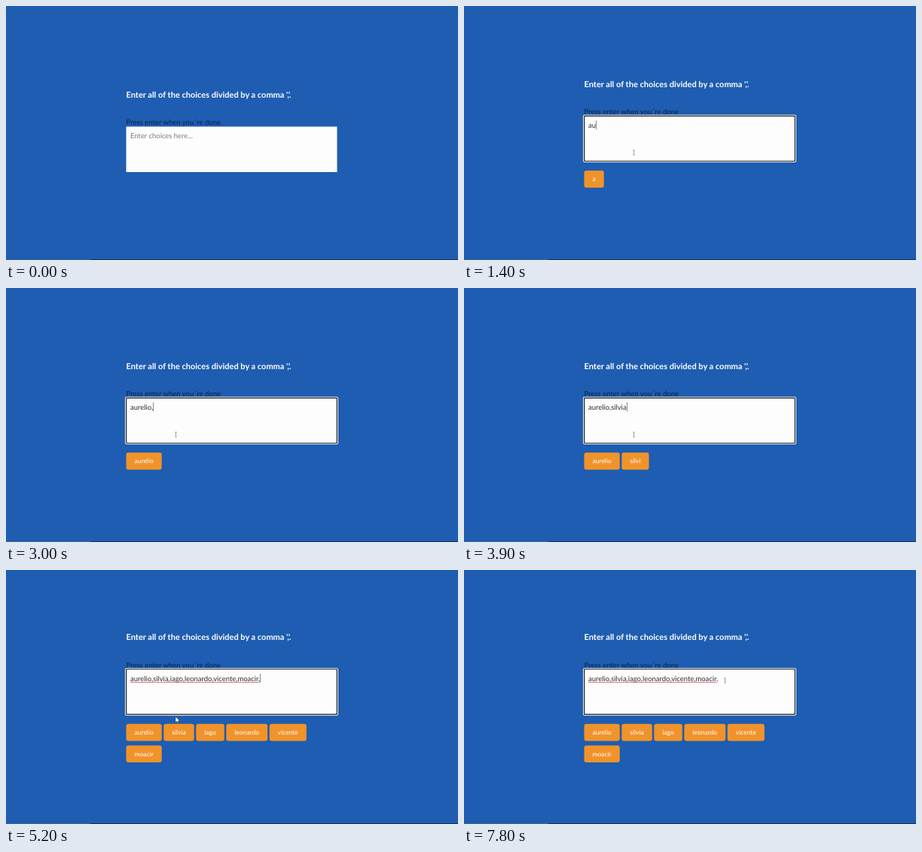
These frames come from a looping animation (600x338 px, 8 s). An HTML page with a canvas:

```html
<!DOCTYPE html>
<html lang="en">
<head>
<meta charset="utf-8">
<title>Choice picker</title>
<style>
html, body { margin: 0; width: 100%; height: 100%; overflow: hidden; background: #1e5db1; }
canvas { display: block; width: 600px; height: 338px; }
</style>
</head>
<body>
<canvas id="stage"></canvas>
<script>
const W = 600, H = 338, LOOP = 8000, TICK = 100;
const canvas = document.getElementById('stage');
const ctx = canvas.getContext('2d');
const ratio = window.devicePixelRatio || 1;
canvas.width = W * ratio;
canvas.height = H * ratio;
ctx.scale(ratio, ratio);
ctx.textRendering = 'geometricPrecision';

const FAMILY = 'Lato, "Open Sans", sans-serif';
const FONT = {
  title: `700 11px ${FAMILY}`,
  label: `400 9.55px ${FAMILY}`,
  input: `400 9.45px ${FAMILY}`,
  chip: `400 8.5px ${FAMILY}`
};
const COLOR = {
  page: '#1e5db1', label: '#0b2145', hint: '#7a7a7a', ink: '#2b2b2b',
  chip: '#f0932b', select: '#2f6fd2', spell: '#e2404a'
};

const FIRST = 'aurelio,', SECOND = 'silvia,';
const FULL = FIRST + SECOND + 'iago,leonardo,vicente,moacir,';
const ANCHOR = FULL.indexOf('leonardo');
const FOCUS = 600, PASTE = 5100, PRESS = 6400, CLICK = 7300;
const LEFT = 159.5, TEXT_X = 165, ROW = 28.6;

// Pointer path as [time, x, y]
const PATH = [
  [100, 138, 268], [300, 182, 232], [500, 225, 195],
  [6100, 225, 195], [6500, 243, 181], [6700, 285, 167],
  [7000, 341, 148], [7200, 346, 147]
];

function setFont(name) { ctx.font = FONT[name]; }

function measure(str, font) {
  setFont(font);
  return ctx.measureText(str).width;
}

function write(str, x, y, font, color) {
  setFont(font);
  ctx.fillStyle = color;
  ctx.fillText(str, x, y);
}

function box(x, y, w, h, r, color) {
  ctx.fillStyle = color;
  ctx.beginPath();
  ctx.roundRect(x, y, w, h, r);
  ctx.fill();
}

function typedAt(t) {
  const count = (start, word) =>
    Math.max(0, Math.min(word.length, Math.floor((t - start) / TICK) + 1));
  if (t >= PASTE) return FULL;
  return FIRST.slice(0, count(1300, FIRST)) + SECOND.slice(0, count(3400, SECOND));
}

function pointerAt(t) {
  if (t < PATH[0][0]) return null;
  const i = PATH.findIndex(p => p[0] > t);
  if (i < 0) return PATH[PATH.length - 1].slice(1);
  const [t0, x0, y0] = PATH[i - 1], [t1, x1, y1] = PATH[i];
  const k = (t - t0) / (t1 - t0);
  return [x0 + (x1 - x0) * k, y0 + (y1 - y0) * k];
}

function caretOn(t) {
  if (t < FOCUS) return false;
  let reset = FOCUS;
  if (t >= 1300) reset = Math.min(t, 2000);
  if (t >= 3400) reset = Math.min(t, 4000);
  if (t >= PASTE) reset = Math.min(t, 5200);
  if (t >= CLICK) reset = CLICK;
  return Math.floor((t - reset) / 500) % 2 === 0;
}

// Index reached by dragging from the anchor
function dragEnd(x) {
  let end = ANCHOR;
  while (end < FULL.length && TEXT_X + measure(FULL.slice(0, end + 1), 'input') <= x) end++;
  return end;
}

function layoutChips(text) {
  let x = LEFT, row = 0;
  return text.split(',').filter(Boolean).map(name => {
    const w = measure(name, 'chip') + 22;
    if (x + w > LEFT + 280) { x = LEFT; row++; }
    const chip = { name, x, w, row };
    x += w + 2.6;
    return chip;
  });
}

function drawField(y, focused) {
  if (focused) {
    box(158, y - 1.6, 283, 63.4, 2, '#fff');
    box(159, y - 0.6, 281, 61.4, 1.4, '#15171c');
    box(160.2, y + 0.6, 278.6, 59, 0.5, '#fdfdfe');
  } else {
    box(LEFT, y, 280, 60.4, 0, '#fdfdfe');
  }
  ctx.strokeStyle = '#b5b5b5';
  ctx.lineWidth = 0.5;
  ctx.beginPath();
  ctx.moveTo(435.5, y + 59);
  ctx.lineTo(438.3, y + 56.2);
  ctx.moveTo(437, y + 59);
  ctx.lineTo(438.3, y + 57.7);
  ctx.stroke();
}

function drawInput(t, text, y, pointer) {
  const base = y + 15.8;
  if (!text) write('Enter choices here...', TEXT_X, base, 'input', COLOR.hint);
  write(text, TEXT_X, base, 'input', COLOR.ink);

  const at = n => TEXT_X + measure(text.slice(0, n), 'input');
  const dragging = t >= PRESS && t < CLICK;
  const end = dragging ? dragEnd(pointer[0]) : text.length;
  if (dragging && end > ANCHOR) {
    const x = at(ANCHOR), w = at(end) - x;
    ctx.save();
    ctx.beginPath();
    ctx.rect(x, base - 10.2, w, 12.6);
    ctx.clip();
    ctx.fillStyle = COLOR.select;
    ctx.fillRect(x, base - 10.2, w, 12.6);
    write(text, TEXT_X, base, 'input', '#fff');
    ctx.restore();
  } else if (caretOn(t)) {
    ctx.fillStyle = 'rgba(0,0,0,.45)';
    ctx.fillRect(Math.round(at(end)), base - 9.8, 1, 12);
  }

  if (t >= PASTE) {
    ctx.fillStyle = COLOR.spell;
    ctx.globalAlpha = 0.8;
    ctx.fillRect(TEXT_X, base + 1.3, at(text.length - 1) - TEXT_X, 0.9);
    ctx.globalAlpha = 1;
  }
}

function drawPointer(t, [x, y], top) {
  const inField = x > LEFT && x < LEFT + 280 && y > top && y < top + 60;
  if (inField) {
    ctx.fillStyle = 'rgba(70,70,80,.5)';
    ctx.fillRect(Math.floor(x), y - 3, 1, 6);
    ctx.fillRect(Math.floor(x) - 1, y - 3.5, 3, 0.8);
    ctx.fillRect(Math.floor(x) - 1, y + 2.7, 3, 0.8);
    return;
  }
  ctx.beginPath();
  [[0, 0], [0, 8], [1.9, 6.3], [3.1, 9], [4.2, 8.5], [3, 5.9], [5.6, 5.7]]
    .forEach(([dx, dy]) => ctx.lineTo(x + dx, y + dy));
  ctx.closePath();
  ctx.fillStyle = '#fff';
  ctx.fill();
  ctx.strokeStyle = '#222';
  ctx.lineWidth = 0.5;
  ctx.stroke();
}

function draw(t) {
  const text = typedAt(t);
  const chips = layoutChips(typedAt(t - TICK));
  const rows = chips.length ? chips[chips.length - 1].row + 1 : 0;
  const shift = -rows * ROW / 2;
  const top = 160.6 + shift;
  const pointer = pointerAt(t);

  ctx.fillStyle = COLOR.page;
  ctx.fillRect(0, 0, W, H);
  ctx.fillStyle = '#122f5c';
  ctx.fillRect(112, 337, W - 112, 1);
  ctx.fillStyle = '#3e6290';
  ctx.fillRect(0, 337, 112, 1);

  write("Enter all of the choices divided by a comma ','.", LEFT, 121.9 + shift, 'title', '#fff');
  write('Press enter when you´re done', LEFT, 158.2 + shift, 'label', COLOR.label);
  drawField(top, t >= FOCUS);
  drawInput(t, text, top, pointer);

  for (const { name, x, w, row } of chips) {
    const y = top + 72.8 + row * ROW;
    box(x, y, w, 22.6, 3, COLOR.chip);
    write(name, x + 11, y + 14.3, 'chip', '#fff');
  }
  if (pointer) drawPointer(t, pointer, top);
}

function frame() {
  const t = performance.now() % LOOP;
  draw(Math.floor(t / TICK) * TICK);
  requestAnimationFrame(frame);
}
frame();
</script>
</body>
</html>
```
